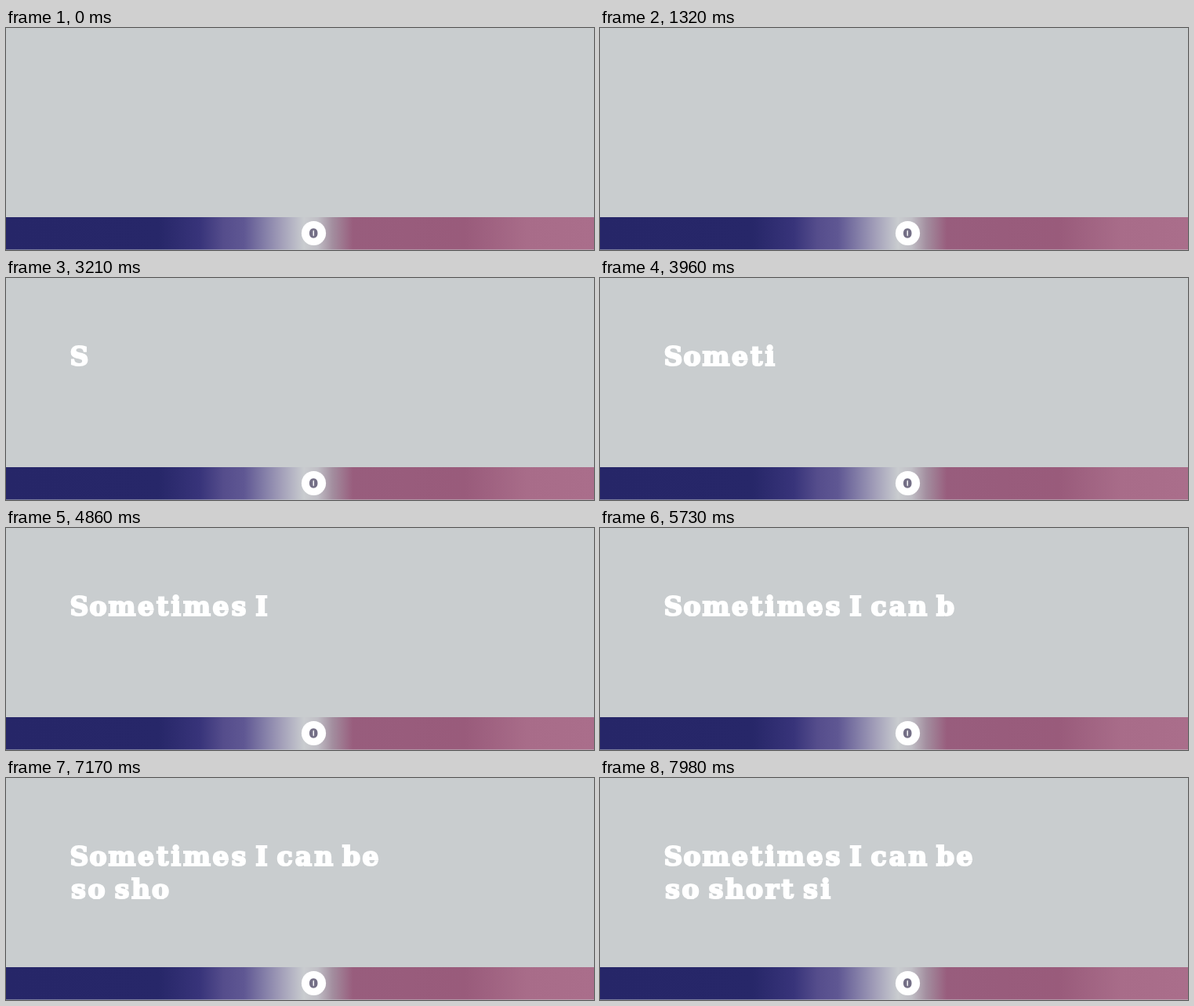
Animation of 750 by 284 pixels, one loop 8 s. Source, as an HTML page:

```html
<!DOCTYPE html>
<html lang="en">
<head>
<meta charset="utf-8">
<title>Typing headline</title>
<style>
  html, body { margin: 0; width: 100%; height: 100%; overflow: hidden; background: #c9cdcf; }
  svg { display: block; width: 100%; height: 100%; }
  text { font-family: "DejaVu Serif", serif; font-weight: 700; text-anchor: middle; stroke-linejoin: miter; }
  .line { font-size: 33px; fill: #fff; stroke: #fff; stroke-width: 2.2px; }
  .count { font-size: 15px; fill: #746f86; stroke: #746f86; stroke-width: 1.6px; }
</style>
</head>
<body>
<svg viewBox="0 0 750 284">
  <defs>
    <linearGradient id="band" gradientUnits="userSpaceOnUse" x1="0" y1="0" x2="750" y2="0">
      <stop offset="0" stop-color="#262668"/>
      <stop offset=".26" stop-color="#272769"/>
      <stop offset=".33" stop-color="#38347a"/>
      <stop offset=".37" stop-color="#554d8c"/>
      <stop offset=".405" stop-color="#5f5793"/>
      <stop offset=".465" stop-color="#9f9bb7"/>
      <stop offset=".507" stop-color="#c9cccf"/>
      <stop offset=".53" stop-color="#c0bec5"/>
      <stop offset=".555" stop-color="#a38e9f"/>
      <stop offset=".59" stop-color="#985d7d"/>
      <stop offset=".78" stop-color="#995b7b"/>
      <stop offset=".885" stop-color="#a86c89"/>
      <stop offset="1" stop-color="#aa6e8b"/>
    </linearGradient>
  </defs>
  <rect width="750" height="284" fill="#c9cdcf"/>
  <text class="line" y="112"></text>
  <text class="line" y="154.3"></text>
  <rect y="242" width="750" height="41.5" fill="url(#band)"/>
  <circle cx="392.5" cy="262.5" r="15.6" fill="#fff"/>
  <text class="count" x="392.3" y="268">0</text>
</svg>
<script>
  const LOOP = 8000, START = 3107, STEP = 163, LEFT = 81.5;
  const lines = ["Sometimes I can be", "so short si"];
  const advance = { S: 24, o: 24, m: 37, e: 24, t: 18, i: 16.5, s: 22, I: 17,
                    c: 23, a: 25, n: 26.5, b: 25, h: 26, r: 21, " ": 9.5 };
  const nodes = document.querySelectorAll(".line");

  // Centre of every letter along its line.
  function centres(line) {
    let x = LEFT;
    return [...line].map(ch => {
      const mid = x + advance[ch] / 2;
      x += advance[ch];
      return mid;
    });
  }

  lines.forEach((line, i) => nodes[i].setAttribute("x", centres(line).join(" ")));

  function draw(time) {
    let typed = Math.max(0, Math.floor((time - START) / STEP) + 1);
    lines.forEach((line, i) => {
      const shown = line.slice(0, Math.max(0, typed));
      if (nodes[i].textContent !== shown) nodes[i].textContent = shown;
      typed -= line.length + 1;
    });
  }

  const origin = performance.now();
  function tick() {
    draw((performance.now() - origin) % LOOP);
    requestAnimationFrame(tick);
  }
  tick();
</script>
</body>
</html>
```
